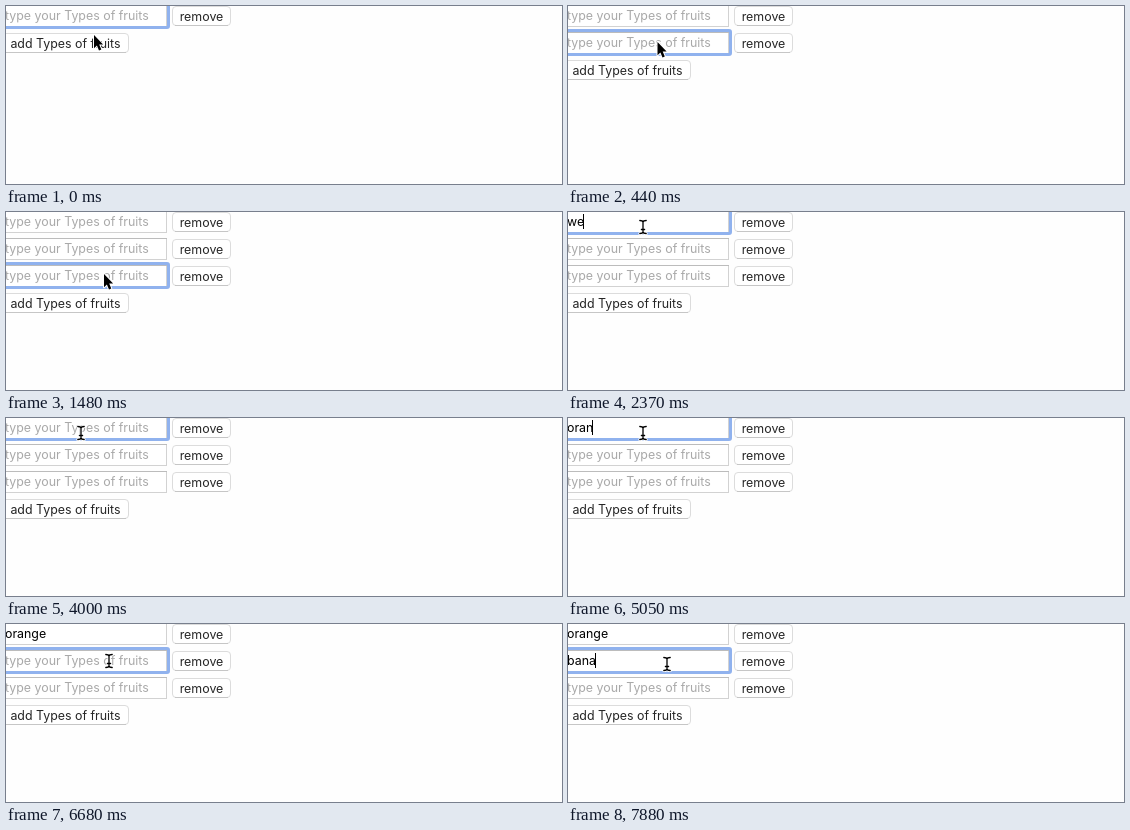
An HTML page that plays this animation: 556x178 px, repeating every 8000 ms.

```html
<!DOCTYPE html>
<html lang="en">
<head>
<meta charset="utf-8">
<title>Fruit list form</title>
<style>
  html, body { margin: 0; width: 100%; height: 100%; overflow: hidden; background: #fefefe; }
  svg { display: block; width: 556px; height: 178px; }
  text { font: 12.4px Inter, Roboto, sans-serif; white-space: pre; }
  .label { fill: #262626; }
  .field { fill: #fff; stroke: #d2d2d2; }
  .edge { fill: none; stroke: #bcbcbc; }
  .ring { fill: none; stroke: #90b2ee; stroke-width: 3; }
  .button { fill: #fff; stroke: #dcdcdc; }
  .shade { fill: none; stroke: #c6c6c6; }
</style>
</head>
<body>
<svg id="stage" viewBox="0 0 556 178" xmlns="http://www.w3.org/2000/svg">
  <g id="form"></g>
  <g id="arrow">
    <path d="M0 0V13.2L2.9 10.5 5 15.4 7.3 14.4 5.2 9.6H9.1Z" fill="#000" stroke="#fff" stroke-width="2" stroke-linejoin="round" paint-order="stroke"/>
  </g>
  <g id="beam" fill="none" stroke-linecap="round">
    <path d="M-3.2-6.5Q-.4-6.5 0-5Q.4-6.5 3.2-6.5M0-5V5M-3.2 6.5Q-.4 6.5 0 5Q.4 6.5 3.2 6.5M-1.6 2.5H1.6" stroke="#fff" stroke-width="3"/>
    <path d="M-3.2-6.5Q-.4-6.5 0-5Q.4-6.5 3.2-6.5M0-5V5M-3.2 6.5Q-.4 6.5 0 5Q.4 6.5 3.2 6.5M-1.6 2.5H1.6" stroke="#000" stroke-width="1.3"/>
  </g>
</svg>
<script>
const LOOP = 8000, PITCH = 27, TEXT_X = -1;
const HINT = 'type your Types of fruits';
const $ = id => document.getElementById(id);
const form = $('form');

function add(parent, tag, attrs, content = '') {
  const el = document.createElementNS('http://www.w3.org/2000/svg', tag);
  for (const key in attrs) el.setAttribute(key, attrs[key]);
  el.textContent = content;
  parent.append(el);
  return el;
}

const show = (el, on) => el.setAttribute('visibility', on ? 'visible' : 'hidden');
const place = (el, x, y) => el.setAttribute('transform', `translate(${x} ${y})`);

function addButton(parent, x, width, label) {
  add(parent, 'rect', { class: 'button', x: x + .5, y: .5, width: width - 1, height: 19, rx: 3.5 });
  add(parent, 'path', { class: 'shade', d: `M${x + 3} 19.5H${x + width - 3}` });
  add(parent, 'text', { class: 'label', x: x + width / 2, y: 14.5, 'text-anchor': 'middle' }, label);
}

function addRow(_, i) {
  const g = add(form, 'g', {});
  place(g, 0, i * PITCH);
  add(g, 'rect', { class: 'field', x: -9.5, y: -.5, width: 170, height: 21 });
  add(g, 'path', { class: 'edge', d: 'M-10-.5H161' });
  const text = add(g, 'text', { x: TEXT_X, y: 14 });
  const ring = add(g, 'rect', { class: 'ring', x: -9.5, y: -2.5, width: 172, height: 24, rx: 1.5 });
  const caret = add(g, 'rect', { y: 2, width: 1, height: 15, fill: '#000' });
  addButton(g, 166, 59, 'remove');
  return { g, text, ring, caret };
}

const rows = Array.from({ length: 3 }, addRow);
const addMore = add(form, 'g', {});
addButton(addMore, -4, 127, 'add Types of fruits');

// Pointer positions: time, x, y, shape
const pointer = [
  [0, 88, 29, 'arrow'], [150, 89.5, 36, 'arrow'],
  [740, 91, 41, 'arrow'], [890, 94, 49, 'arrow'], [1040, 97, 58, 'arrow'], [1180, 98, 62, 'arrow'],
  [1630, 92, 46, 'beam'], [1780, 82, 29, 'beam'], [1920, 75, 15, 'beam'],
  [5640, 121, 19, 'beam'], [5790, 194, 26, 'arrow'], [5940, 222, 31, 'arrow'],
  [6090, 219, 47, 'arrow'], [6240, 205, 61, 'arrow'], [6390, 146, 46, 'beam'],
  [6540, 103, 37, 'beam'], [6830, 99, 40, 'beam']
];

// Form changes: time, changed properties
const changes = [
  [0, { count: 1, focus: 0, first: '', second: '', caret: true }],
  [290, { count: 2, focus: 1 }],
  [1330, { count: 3, focus: 2 }],
  [2070, { focus: 0 }],
  ...typing('first', [2220, 2370, 2670, 2820, 2960], ['w', 'we', 'wer', 'werwe', 'werwer']),
  ...typing('first', [3410, 3560, 3700, 3850, 4000], ['werwe', 'werw', 'we', 'w', '']),
  ...typing('first', [4450, 4750, 4900, 5050, 5200, 5350], ['o', 'or', 'ora', 'oran', 'orang', 'orange']),
  [5640, { caret: false }],
  [6540, { focus: 1, caret: true }],
  ...typing('second', [7730, 7880], ['ban', 'bana'])
];

function typing(field, times, words) {
  return times.map((time, i) => [time, { [field]: words[i] }]);
}

function render(t) {
  const past = ([time]) => time <= t;
  const state = Object.assign({}, ...changes.filter(past).map(c => c[1]));
  const values = [state.first, state.second, ''];

  rows.forEach(({ g, text, ring, caret }, i) => {
    const focused = state.focus === i;
    g.style.display = i < state.count ? '' : 'none';
    text.textContent = values[i] || HINT;
    text.setAttribute('fill', values[i] ? '#000' : '#a9a9a9');
    show(ring, focused);
    show(caret, focused && state.caret);
    if (focused) {
      const width = values[i] ? text.getComputedTextLength() : 0;
      caret.setAttribute('x', Math.floor(TEXT_X + width - .5));
    }
  });
  place(addMore, 0, state.count * PITCH);

  const [, x, y, shape] = pointer.filter(past).pop();
  for (const name of ['arrow', 'beam']) {
    show($(name), name === shape);
    place($(name), x, y);
  }
}

const start = performance.now();
function tick() {
  render((performance.now() - start) % LOOP);
  requestAnimationFrame(tick);
}
tick();
</script>
</body>
</html>
```
